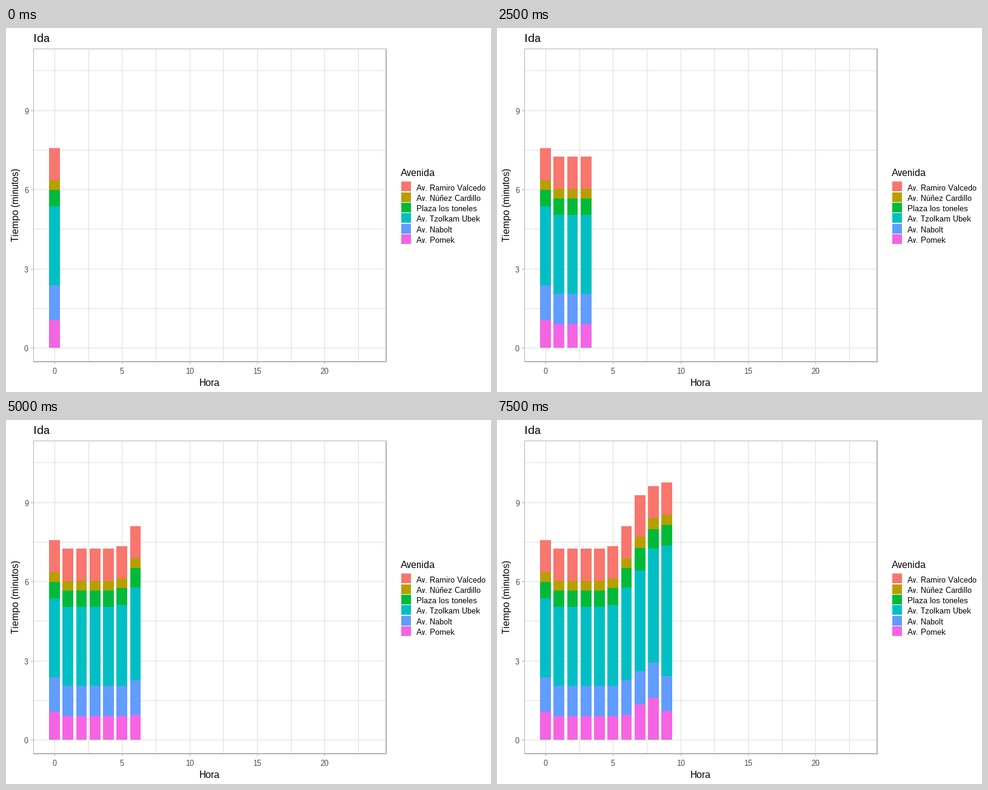
These frames come from a looping animation (800x600 px, 8000 ms). A matplotlib script:

```python
import math

import matplotlib.pyplot as plt
from matplotlib.animation import FuncAnimation
from matplotlib.patches import Rectangle

plt.rcParams.update({
    "font.family": "Liberation Sans",
    "text.hinting": "native",
    "text.hinting_factor": 1,
})

W, H, DPI = 800, 600, 100
LOOP_MS, STEP_MS = 8000, 20
BAR_MS = 2500 / 3  # one more bar every five sixths of a second

GRID, BORDER, TICK_TEXT = "#DEDEDE", "#B3B3B3", "#4D4D4D"
LEFT, TOP, RIGHT, BOTTOM = 45, 34, 626, 549
BASE = 527

STREETS = [
    ("Av. Ramiro Valcedo", "#F8766D"),
    ("Av. Núñez Cardillo", "#B79F00"),
    ("Plaza los toneles", "#00BA38"),
    ("Av. Tzolkam Ubek", "#00BFC4"),
    ("Av. Nabolt", "#619CFF"),
    ("Av. Pomek", "#F564E3"),
]

# Upper edge of each segment, top to bottom, one row per hour
NIGHT = (212, 265, 281, 308, 438, 488)
STACKS = [
    (198, 251, 267, 294, 424, 481),
    NIGHT, NIGHT, NIGHT, NIGHT,
    (208, 261, 277, 305, 438, 488),
    (175, 228, 244, 276, 429, 486),
    (124, 192, 211, 248, 414, 469),
    (109, 162, 180, 212, 400, 458),
    (103, 156, 173, 207, 422, 480),
]

fig = plt.figure(figsize=(W / DPI, H / DPI), dpi=DPI, facecolor="white")
ax = fig.add_axes([0, 0, 1, 1])
ax.set_xlim(0, W)
ax.set_ylim(H, 0)
ax.axis("off")


def nearest(v):
    return math.floor(v + 0.5)


def hour_x(hour, start=80.0):
    return nearest(start + 22.26 * hour)


def minute_y(minutes):
    return nearest(527.1 - 43.493 * minutes)


def box(x0, y0, x1, y1, color):
    return ax.add_patch(Rectangle((x0, y0), x1 - x0, y1 - y0, fc=color, lw=0))


def label(x, y, text, px, color="black", ha="left", rotation=0):
    ax.text(x, y, text, fontsize=px * 72 / DPI, color=color, ha=ha,
            va="baseline", rotation=rotation, rotation_mode="anchor")


def draw_panel():
    for i in range(10):
        x = hour_x(2.5 * i)
        box(x, TOP, x + 1, BOTTOM, GRID)
    for i in range(8):
        y = minute_y(1.5 * i)
        box(LEFT, y, RIGHT, y + 1, GRID)


def draw_frame():
    box(LEFT, TOP, LEFT + 1, BOTTOM + 2, BORDER)
    box(LEFT, TOP, RIGHT + 2, TOP + 1, BORDER)
    box(RIGHT, TOP, RIGHT + 2, BOTTOM + 2, BORDER)
    box(LEFT, BOTTOM, RIGHT + 2, BOTTOM + 2, BORDER)
    for hour in range(0, 25, 5):
        x = hour_x(hour)
        box(x, BOTTOM + 2, x + 1, BOTTOM + 5, BORDER)
        label(x + 0.5, 570, str(hour), 13, TICK_TEXT, "center")
    for minutes in range(0, 10, 3):
        y = minute_y(minutes)
        box(LEFT - 4, y, LEFT, y + 1, BORDER)
        label(37, y + 6, str(minutes), 13, TICK_TEXT, "right")
    label(45, 23, "Ida", 19)
    label(336, 590, "Hora", 16, ha="center")
    label(21, 291.5, "Tiempo (minutos)", 16, ha="center", rotation=90)


def draw_legend():
    label(651, 244, "Avenida", 16)
    for i, (name, color) in enumerate(STREETS):
        y = nearest(253.4 + 17.28 * i)
        box(652, y, 668, y + 16, color)
        label(677, nearest(267.6 + 17.28 * i), name, 13)


def draw_bar(hour, tops):
    x0, x1 = hour_x(hour, 71.1), hour_x(hour, 88.9)
    edges = tops + (BASE,)
    return [box(x0, edges[i], x1, edges[i + 1], color)
            for i, (_, color) in enumerate(STREETS)]


draw_panel()
bars = [draw_bar(hour, tops) for hour, tops in enumerate(STACKS)]
draw_frame()
draw_legend()


def update(frame):
    middle = frame * STEP_MS + STEP_MS / 2
    # Switch times fall on whole hundredths of a second
    for hour, parts in enumerate(bars):
        shown = middle >= round(hour * BAR_MS, -1)
        for part in parts:
            part.set_visible(shown)
    return [part for parts in bars for part in parts]


anim = FuncAnimation(fig, update, frames=LOOP_MS // STEP_MS, interval=STEP_MS,
                     init_func=lambda: update(0), repeat=True, repeat_delay=0,
                     blit=False)

plt.show()
```
